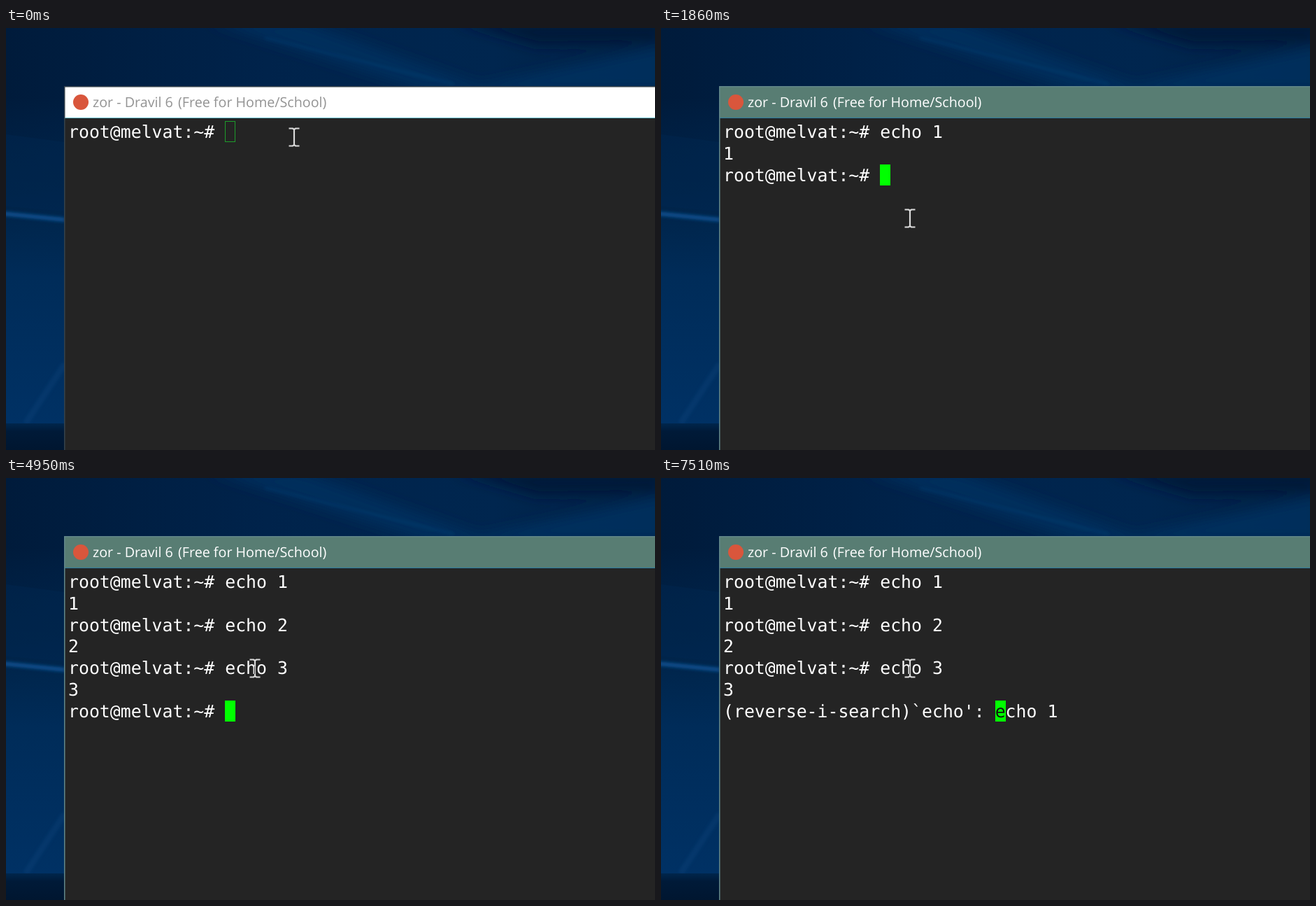
These frames come from a looping animation (928x603 px, 8 s). An HTML page:

```html
<!DOCTYPE html>
<html lang="en">
<head>
<meta charset="utf-8">
<title>Reverse history search</title>
<style>
  html, body { margin: 0; width: 100%; height: 100%; overflow: hidden; background: #001a38; }
  svg { display: block; width: 928px; height: 603px; }
  text { white-space: pre; text-rendering: geometricPrecision; }
  .mono { font: 24.83px "DejaVu Sans Mono", monospace; fill: #fff; }
  .title { font: 19.7px "Open Sans", "Noto Sans", sans-serif; fill: #939393; }
  .active .title { fill: #fff; }
  #bar { fill: #fff; }
  .active #bar { fill: #587d73; }
  #edge { fill: #34424c; }
  .active #edge { fill: #61878a; }
  #rule { fill: #62bccb; }
  .active #rule { fill: #2c7ca0; }
  #caret { fill: none; stroke: #1d9c2b; }
  .active #caret { fill: #0f0; stroke: #0f0; }
  #under { fill: #111; }
  #mouse { mix-blend-mode: difference; }
  #hint { font: bold 55px "Open Sans", "Noto Sans", sans-serif; fill: #e000ff; }
</style>
</head>
<body>
<svg id="stage" viewBox="0 0 928 603">
  <defs>
    <linearGradient id="sky" x2="1" y2="0">
      <stop offset="0" stop-color="#001b3b"/>
      <stop offset=".4" stop-color="#00234b"/>
      <stop offset=".75" stop-color="#00264f"/>
      <stop offset="1" stop-color="#002145"/>
    </linearGradient>
    <linearGradient id="side" x2="0" y2="1">
      <stop offset="0" stop-color="#002f60" stop-opacity="0"/>
      <stop offset=".25" stop-color="#00284f" stop-opacity=".5"/>
      <stop offset=".55" stop-color="#002c59"/>
      <stop offset="1" stop-color="#003164"/>
    </linearGradient>
    <linearGradient id="floor" x2="0" y2="1">
      <stop offset="0" stop-color="#00264c"/>
      <stop offset=".3" stop-color="#001a38"/>
      <stop offset="1" stop-color="#001630"/>
    </linearGradient>
    <filter id="soft" x="-30%" y="-60%" width="160%" height="220%"><feGaussianBlur stdDeviation="9"/></filter>
    <filter id="fine" x="-20%" y="-60%" width="140%" height="220%"><feGaussianBlur stdDeviation="2"/></filter>
  </defs>

  <rect width="928" height="603" fill="url(#sky)"/>
  <g filter="url(#soft)">
    <path d="M290-10L420-10L700 90L600 90Z" fill="#003162" opacity=".75"/>
    <path d="M640 90L940 25V90Z" fill="#003465" opacity=".7"/>
    <path d="M640-10H940V22L760 25Z" fill="#001838" opacity=".9"/>
  </g>
  <path d="M370 14L640 80" stroke="#0a4379" stroke-width="3" opacity=".45" filter="url(#fine)"/>
  <rect y="100" width="84" height="465" fill="url(#side)"/>
  <path d="M0 152L84 163V262L0 255Z" fill="#002a55" opacity=".35"/>
  <path d="M-6 265L84 274" stroke="#0b4d8c" stroke-width="6" filter="url(#fine)"/>
  <path d="M84 480L28 565" stroke="#0a4279" stroke-width="9" opacity=".4" filter="url(#fine)"/>
  <rect y="565" width="84" height="38" fill="url(#floor)"/>

  <g id="window">
    <rect id="edge" x="83" y="83" width="845" height="520"/>
    <rect id="bar" x="84.5" y="84.5" width="844" height="44"/>
    <rect id="rule" x="84.5" y="128" width="844" height="1.2"/>
    <rect x="84.5" y="129" width="844" height="474" fill="#242424"/>
    <circle cx="107" cy="106" r="11" fill="#d9563c"/>
    <text class="title" x="124" y="113">zor - Dravil 6</text>
    <text class="title" x="246" y="113">(Free for Home/School)</text>
    <g id="rows"></g>
    <rect id="caret" width="14" height="29"/>
    <text id="under" class="mono"></text>
  </g>
  <text id="hint" x="586" y="563">Control + R</text>
  <path id="mouse" d="M-7.5-12.5H-2L0-11L2-12.5H7.5M0-11V11M-7.5 12.5H-2L0 11L2 12.5H7.5"
        fill="none" stroke="#fff" stroke-width="2.2"/>
  <circle id="press" cx="353.5" cy="271" r="19" fill="#e85aa5" opacity=".75"/>
</svg>
<script>
const LOOP = 8000, CELL = 14.95, LEFT = 89, PITCH = 30.83;
const PROMPT = "root@melvat:~# ";
const $ = id => document.getElementById(id);

// Command line over time; "\n" runs the current line.
const typing = [
  [760, "e"], [940, "ec"], [1030, "echo"], [1120, "echo "], [1630, "echo 1"], [1860, "\n"],
  [2750, "echo 1"], [3060, "echo "], [3490, "echo 2"], [3620, "\n"],
  [3800, "echo 2"], [4030, "echo "], [4720, "echo 3"], [4950, "\n"]
];
// History search: time, query, match.
const searches = [
  [5740, "", ""], [6120, "e", "echo 3"], [6310, "ec", "echo 3"], [6360, "ech", "echo 3"],
  [6410, "echo", "echo 3"], [7180, "echo", "echo 2"], [7510, "echo", "echo 1"]
];
const moves = [[0, 412, 156], [50, 405, 171], [90, 384, 216], [140, 363, 258], [180, 356, 272]];

const rows = Array.from({ length: 7 }, (_, i) => {
  const row = document.createElementNS("http://www.w3.org/2000/svg", "text");
  row.setAttribute("class", "mono");
  row.setAttribute("x", LEFT);
  row.setAttribute("y", 157 + PITCH * i);
  return $("rows").appendChild(row);
});

const latest = (list, t) => list.filter(item => item[0] <= t).pop();
const within = (t, from, to) => t >= from && t < to;
const show = (el, on) => el.setAttribute("visibility", on ? "visible" : "hidden");

function terminal(t) {
  const lines = [];
  let input = "";
  for (const [at, value] of typing) {
    if (at > t) break;
    if (value === "\n") {
      lines.push(PROMPT + input, input.slice(5));
      input = "";
    } else input = value;
  }
  const found = latest(searches, t);
  const head = found ? "(reverse-i-search)`" + found[1] + "': " : PROMPT + input;
  lines.push(head + (found ? found[2] : ""));
  return { lines, column: head.length };
}

function draw(t) {
  const { lines, column } = terminal(t);
  rows.forEach((row, i) => {
    const line = lines[i] || "";
    if (row.textContent !== line) row.textContent = line;
  });

  const last = lines.length - 1, x = LEFT + column * CELL;
  $("caret").setAttribute("x", Math.round(x) + 0.5);
  $("caret").setAttribute("y", Math.round(133 + PITCH * last) + 0.5);
  $("under").setAttribute("x", x);
  $("under").setAttribute("y", 157 + PITCH * last);
  $("under").textContent = lines[last][column] || "";

  $("window").setAttribute("class", t >= 420 ? "active" : "");
  show($("press"), within(t, 380, 610));
  show($("hint"), within(t, 5740, 6640));
  const [, mx, my] = latest(moves, t);
  $("mouse").setAttribute("transform", `translate(${mx} ${my})`);
}

const start = performance.now();
function tick() {
  draw((performance.now() - start) % LOOP);
  requestAnimationFrame(tick);
}
tick();
</script>
</body>
</html>
```
